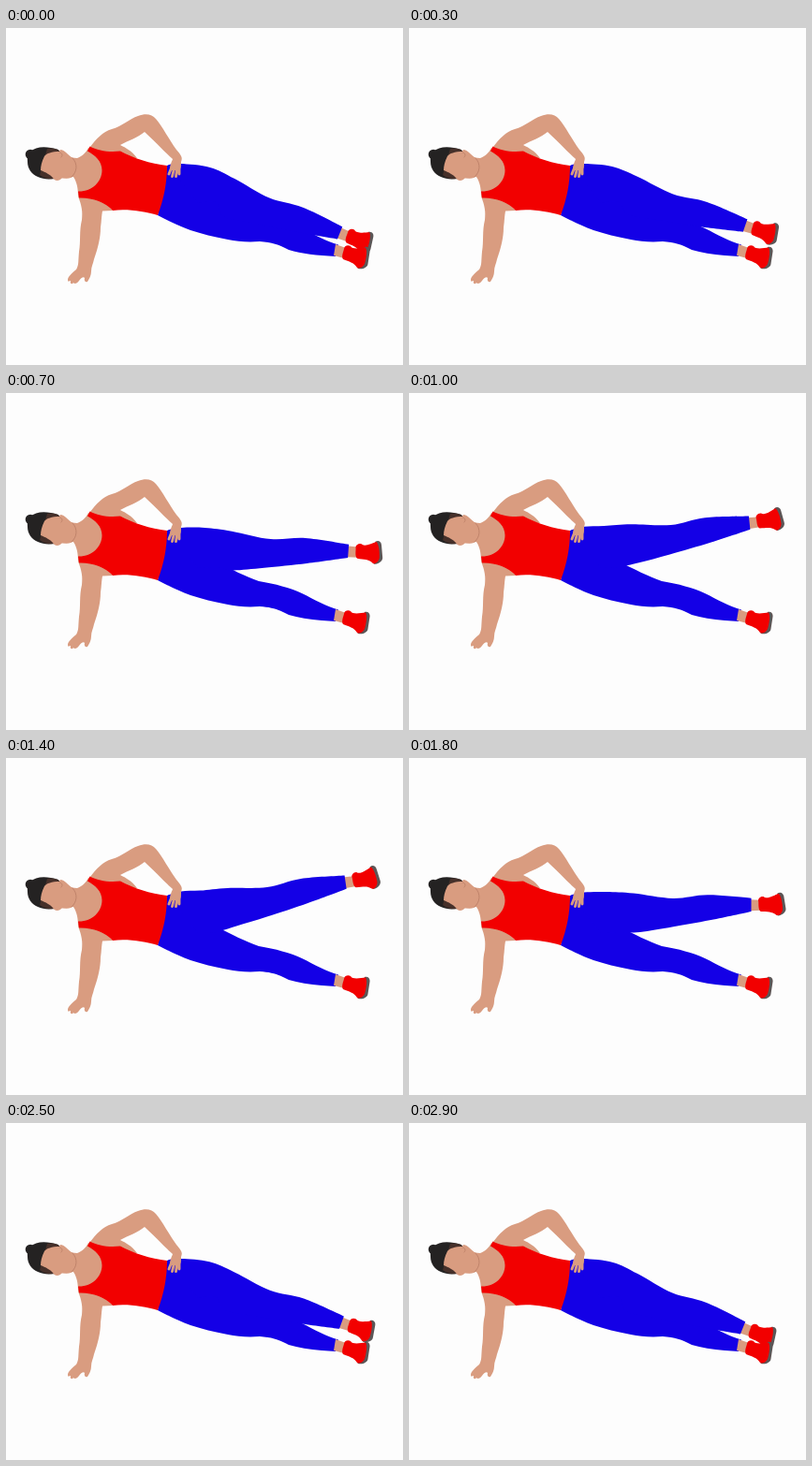
Recreate the animation shown at these times as an HTML page. Size 424 by 360 pixels, loop 3000 ms.

```html
<!DOCTYPE html>
<html lang="en">
<head>
<meta charset="utf-8">
<title>Side plank leg raise</title>
<style>
  html, body { margin: 0; width: 100%; height: 100%; overflow: hidden; background: #fdfdfd; }
  svg { display: block; width: 100vw; height: 100vh; }
  .skin { fill: #d99c80; }
  .red { fill: #f20000; }
  .blue { fill: #1400e6; }
  .hair { fill: #242222; }
  .brown { fill: #46302a; }
  .sole { fill: #5c5656; }
  .line { fill: none; stroke: #bd8068; stroke-width: .9; stroke-linecap: round; }
  .fingers { fill: none; stroke: #d99c80; stroke-width: 2.9; stroke-linecap: round; }
</style>
</head>
<body>
<svg viewBox="0 0 424 360" xmlns="http://www.w3.org/2000/svg">
  <defs>
    <!-- drawn around the ankle -->
    <g id="shoe">
      <path class="skin" d="M-5 -7L6 -3L4 8L-7 5Z"/>
      <path class="sole" d="M26 -4C30 -5 32 -2 31.500 1L29.500 14C29 18 24 20 19 19L17 15Z"/>
      <path class="red" d="M4 -2C4 -5 8 -7 11 -5C13 -1 22 -3 27 -3.500C29 -1 28 8 26 14C24 18 20 19.500 18 18C14 12 10 12 3 9C1 6 3 2 4 -2Z"/>
    </g>
  </defs>

  <!-- legs -->
  <path class="blue" d="M172 147C180 143 194 145 202 150C214 158 219 170 224 180C240 188 256 196 270 201C288 204 303 208 316 214C330 221 342 228 355 231.500L352 244C332 243 316 241 302 237C291 231 284 229 271 228C258 229 247 228 237 226C222 223 209 220 197 216C183 211 172 205 162 200Z"/>
  <g id="foot"><use href="#shoe" transform="translate(368 192) rotate(-6)"/></g>
  <path id="leg" class="blue"/>
  <use href="#shoe" transform="translate(357 238)"/>

  <!-- arms, neck and torso -->
  <path class="skin" d="M77 180C81 190 82 196 81 205C78 217 80 228 78 239C77 249 78 253 75 258C70 262 66 266 66 269C66 272 68 270 69 270C68 274 71 274 72 272C73 274 76 273 78 270C80 267 83 265 84 267C83 270 85 272 87 271C89 268 91 264 91 260C91 255 93 252 94 247C98 236 101 224 101 213C102 206 102 200 103 195.500L114 195L98 180Z"/>
  <path class="skin" d="M89 128C97 118 103 111 113 108C124 105 132 97 141 94C149 91 156 92 160 97C167 105 174 119 182 130C187 136 189 138 187 143C187 148 187 150 185 152L175 152C175 146 177 143 178 140C170 133 162 124 148 111C141 117 131 120 122 125C128 128 134 131 140 139L112 140Z"/>
  <path class="skin" d="M57 131C62 134 68 139 76 139C81 137 85 134 88 128L106 140L106 172L77 180C77 172 76 165 72 159C66 160 62 161 56 160Z"/>
  <path class="red" d="M89.500 126.500C98 131 110 133 122 131.500C136 139 154 145 172 147C172 164 169 182 162 200C148 196 130 193 114 195C106 186 92 181 78 181.500L77 174.500C92 175 102.500 164 102.500 152C102.500 142 95 136 87 131.500Z"/>
  <path class="fingers" d="M178 146L174 156M180 148L177.500 158.500M183 148L181.500 158.500M185 146L185 156"/>

  <!-- head -->
  <circle class="hair" cx="26" cy="135" r="5.300"/>
  <path class="hair" d="M26 132C32 126 44 126 56 130L57 158C50 163 41 162 34 159C27 156 23 150 23 143C23 138 22 135 26 132Z"/>
  <path class="brown" d="M44 129C49 128 54 129 57 131L56 160C50 162 42 162 36 157Z"/>
  <path class="skin" d="M57 132C49 132 43 134 41 137C38 143 37 148 37 152C42 154 48 157 50 160C52 164 57 164 60 160C66 162 71 160 74 156C77 150 76 144 71 139C66 135 62 130 58 130Z"/>
  <path class="line" d="M71 139C77 145 76 154 70 159M57 133C60 133 61 136 59 138"/>
</svg>
<script>
const LOOP = 3000, STEP = 100;
const HIP = [199, 164.5];
const LOW = 9.7, SWEEP = 30.8; // degrees
// key points of the raised leg's outline at 0 degrees
const TOP = [[215, 146], [243, 153.5], [283, 167.5], [320, 171.5], [365, 184.5]];
const UNDER = [[362, 198.5], [318, 198.5], [272, 197], [238, 195]];

const foot = document.getElementById('foot');
const leg = document.getElementById('leg');

function ease(u) {
  return (1 - Math.cos(Math.PI * Math.min(1, Math.max(0, u)))) / 2;
}

function angleAt(t) {
  const raised = ease((t - 75) / 1150) - ease((t - 1250) / 1500);
  return LOW - SWEEP * raised;
}

function turn(points, deg) {
  const r = deg * Math.PI / 180, c = Math.cos(r), s = Math.sin(r);
  return points.map(([x, y]) => {
    const dx = x - HIP[0], dy = y - HIP[1];
    return [HIP[0] + dx * c - dy * s, HIP[1] + dx * s + dy * c];
  });
}

// smooth curve through the points, without the leading move
function curve(p) {
  let d = '';
  for (let i = 0; i < p.length - 1; i++) {
    const a = p[i - 1] || p[i], b = p[i], c = p[i + 1], e = p[i + 2] || c;
    const n = [b[0] + (c[0] - a[0]) / 6, b[1] + (c[1] - a[1]) / 6,
               c[0] - (e[0] - b[0]) / 6, c[1] - (e[1] - b[1]) / 6, ...c];
    d += 'C' + n.map(v => v.toFixed(2)).join(' ');
  }
  return d;
}

function draw(t) {
  const deg = angleAt(t);
  const lift = Math.max(0, -deg) * 0.12;
  const top = [[173, 147], [187, 145 - lift], ...turn(TOP, deg)];
  const under = [...turn(UNDER, deg), [224, 186], [205, 187]];
  leg.setAttribute('d', 'M' + top[0] + curve(top) + 'L' + under[0] + curve(under) + 'Z');
  foot.setAttribute('transform', `rotate(${deg.toFixed(3)} ${HIP})`);
}

function tick() {
  const t = performance.now() % LOOP;
  draw(Math.floor(t / STEP) * STEP);
  requestAnimationFrame(tick);
}
tick();
</script>
</body>
</html>
```
